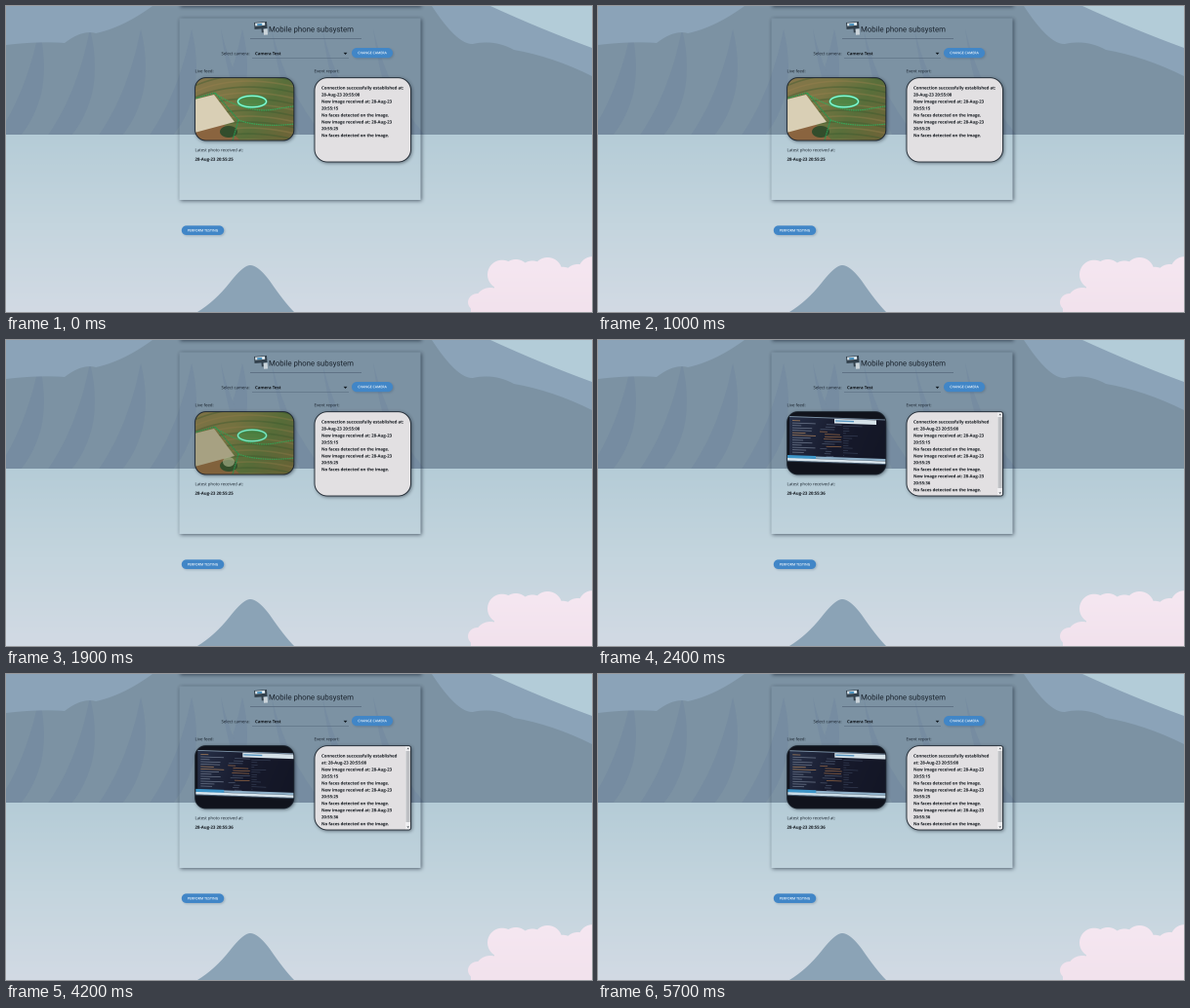
These frames come from a looping animation (600 px wide and 314 px high, 5800 ms). An HTML page with a canvas:

```html
<!DOCTYPE html>
<html lang="en">
<head>
<meta charset="utf-8">
<title>Mobile phone subsystem</title>
<style>
html, body { margin: 0; width: 100%; height: 100%; overflow: hidden; background: #b7cbd8; }
canvas { display: block; width: 600px; height: 314px; }
</style>
</head>
<body>
<canvas id="stage"></canvas>
<script>
const W = 600, H = 314, LOOP = 5800, HORIZON = 132;
const DIM = 1900, UPDATE = 2400, TIP = 3100, REFRESH = 450, TICK = 100;
const SANS = '"Open Sans", "Noto Sans", sans-serif';
const INK = '#18212b';

// The page is painted large, then reduced for soft small type
const S = 4;
const sheet = document.createElement('canvas');
sheet.width = W * S;
sheet.height = H * S;
const ctx = sheet.getContext('2d');
ctx.scale(S, S);
ctx.textRendering = 'geometricPrecision';

const stage = document.getElementById('stage');
const dpr = window.devicePixelRatio || 1;
stage.width = W * dpr;
stage.height = H * dpr;
const view = stage.getContext('2d');
view.imageSmoothingQuality = 'high';

function rect(x, y, w, h, color) {
  ctx.fillStyle = color;
  ctx.fillRect(x, y, w, h);
}

function shape(d, color) {
  ctx.fillStyle = color;
  ctx.fill(new Path2D(d));
}

function line(d, color, width, dash = []) {
  ctx.strokeStyle = color;
  ctx.lineWidth = width;
  ctx.setLineDash(dash);
  ctx.stroke(new Path2D(d));
  ctx.setLineDash([]);
}

function oval(x, y, rx, ry, color, width) {
  ctx.beginPath();
  ctx.ellipse(x, y, rx, ry, 0, 0, Math.PI * 2);
  ctx.fillStyle = ctx.strokeStyle = color;
  ctx.lineWidth = width;
  width ? ctx.stroke() : ctx.fill();
}

function gradient(x0, y0, x1, y1, ...colors) {
  const g = ctx.createLinearGradient(x0, y0, x1, y1);
  colors.forEach((c, i) => g.addColorStop(i / (colors.length - 1), c));
  return g;
}

function shadow(blur, color, draw) {
  ctx.save();
  ctx.shadowColor = color;
  ctx.shadowBlur = blur * S;
  ctx.shadowOffsetX = ctx.shadowOffsetY = S;
  draw();
  ctx.restore();
}

function text(str, x, y, { size = 4.32, weight = 400, color = INK, font = SANS, align = 'left' } = {}) {
  ctx.font = `${weight} ${size}px ${font}`;
  ctx.fillStyle = color;
  ctx.textAlign = align;
  ctx.fillText(str, x, y);
}

const bold = (str, x, y) => text(str, x, y, { weight: 700, color: '#10151b' });

// Small seeded generator for repeatable details
function seeded(seed) {
  return () => (seed = seed * 16807 % 2147483647) / 2147483647;
}

function mountains() {
  rect(0, 0, W, HORIZON, '#8ba3b8');
  shape('M496 0 Q548 24 600 43 V0Z', '#b3ccd8');
  const front = 'M0 40 Q35 36 60 38 Q78 24 92 28 Q120 22 150 0 H436 Q462 40 478 39 Q500 34 520 45 Q560 52 600 72 V132 H0Z';
  shape(front, '#7c92a3');
  ctx.save();
  ctx.clip(new Path2D(front));
  for (let i = 0; i < 9; i++) {
    const x = i * 52 - 10, lean = i < 5 ? 44 : -30;
    shape(`M${x} 134 Q${x + lean * .7} 90 ${x + lean} 24 Q${x + lean + 16} 90 ${x + 24} 134Z`, '#768ca1');
  }
  ctx.restore();
}

function cloud() {
  const pink = gradient(0, 260, 0, 314, '#f5e7f1', '#f2e2ed');
  for (let i = 0; i < 7; i++) {
    const top = 275 + 6 * Math.sin(i * 1.9 - .4);
    oval(508 + i * 15.5, top + 3, 15, 15, pink);
  }
  oval(522, 273, 14, 13, pink);
  oval(496, 302, 15, 13, pink);
  oval(483, 304, 10, 9, pink);
  rect(476, 303, 124, 11, pink);
  rect(500, 285, 100, 29, pink);
}

function landscape() {
  mountains();
  rect(0, HORIZON, W, H - HORIZON, gradient(0, HORIZON, 0, H, '#b5ccd7', '#c4d5de', '#d2dae4'));
  shape('M196 314 Q214 303 229 284 Q243 266 250 266 Q258 266 270 282 Q285 304 295 314Z', '#8ba3b6');
  cloud();
}

// Shadows fall outside the clear cards only
function cards() {
  ctx.save();
  ctx.beginPath();
  ctx.rect(0, 0, W, H);
  ctx.rect(177.5, 12.5, 247, 186.5);
  ctx.clip('evenodd');
  for (const [y, h] of [[12.5, 186.5], [-8, 8]]) {
    shadow(4, 'rgba(20,32,48,.65)', () => rect(177.5, y, 247, h, '#70869b'));
  }
  ctx.restore();
}

function cameraIcon() {
  ctx.save();
  ctx.translate(254, 17);
  ctx.rotate(-.08);
  rect(0, 0, 13, 7, '#33414d');
  rect(1, .7, 10, 3, '#dce6ec');
  rect(3, 1.5, 5, 2, '#4b91bd');
  rect(7, 6, 2, 5, '#33414d');
  rect(9, 7.5, 4, 6, '#cbd4da');
  ctx.restore();
}

function button(label, x, y, w, h) {
  shadow(2, 'rgba(30,60,90,.25)', () => {
    ctx.beginPath();
    ctx.roundRect(x, y, w, h, h / 2);
    ctx.fillStyle = '#4186c7';
    ctx.fill();
  });
  text(label, x + w / 2, y + h / 2 + 1.25, { size: 3.5, weight: 600, color: '#f4f9fd', align: 'center' });
}

function controls() {
  cameraIcon();
  text('Mobile phone subsystem', 269, 26.6, { size: 7.8, font: 'Roboto, sans-serif' });
  rect(250, 33.2, 114, .7, '#53667a');
  text('Select camera:', 220.5, 50.2);
  rect(252, 53, 99, .6, '#596d81');
  bold('Camera Test', 255, 50.2);
  shape('M345.6 47.8 h3.8 l-1.9 2.2Z', '#111820');
  button('CHANGE CAMERA', 354, 43, 42, 10.2);
  button('PERFORM TESTING', 179.8, 225.4, 43.4, 9.6);
  text('Live feed:', 193.5, 68.2);
  text('Event report:', 315.5, 68.2);
  text('Latest photo received at:', 193.5, 149.2);
}

function frameBox(x, y, w, h, r, fill, content) {
  const box = new Path2D();
  box.roundRect(x, y, w, h, r);
  ctx.fillStyle = fill;
  shadow(4, 'rgba(10,18,28,.6)', () => ctx.fill(box));
  ctx.save();
  ctx.clip(box);
  content();
  ctx.restore();
  ctx.strokeStyle = '#1d2630';
  ctx.lineWidth = .9;
  ctx.stroke(box);
}

function fieldPhoto(dim) {
  rect(193, 73, 103, 66, gradient(200, 74, 285, 138, '#85764a', '#7b7644', '#596f3b', '#6d6538'));
  for (let i = 0; i < 15; i++) {
    const y = 70 + i * 6;
    line(`M193 ${y} q43 -19 103 -5`, i % 2 ? 'rgba(153,128,78,.4)' : 'rgba(54,87,45,.4)', 1.6);
  }
  shape('M193 127 L222 121 L240 138 H193Z', '#8a643f');
  shape('M193 96 L213 91 L234 119 L193 130Z', dim ? '#b5ac90' : '#d9cfb5');
  oval(228, 129, 9, 6, '#334d2c');
  line('M193 95 L214 89 L238 117 L232 138', '#2b944f', 1.5, [1.5, .7]);
  line('M214 90 Q247 111 275 106 T296 104 M238 117 Q260 125 296 121', '#36a85a', 1.2, [1.5, .8]);
  oval(252, 98, 14.5, 5.8, 'rgba(65,151,76,.55)');
  oval(252, 98, 14.5, 5.8, '#36d6a1', 2);
  oval(252, 98, 14.5, 5.8, '#b0ffe1', .8);
  if (dim) {
    rect(193, 73, 103, 66, 'rgba(70,84,38,.13)');
    oval(228, 125, 6, 5, 'rgba(170,177,139,.65)');
  }
}

function screenPhoto(step, tip) {
  const random = seeded(41);
  rect(190, 70, 110, 72, '#10131c');
  ctx.save();
  // Each refresh of the hand-held feed sits slightly differently
  ctx.translate(194 + Math.sin(step * 2) * .3, 78 + Math.sin(step * 3) * .25);
  ctx.transform(1, .035, 0, 1, 0, 0);
  rect(2, 0, 100, 41, gradient(0, 0, 100, 40, '#28324a', '#171a2c', '#131625'));
  rect(2, 0, 100, .9, '#7d93a8');
  rect(48, 1.2, tip ? 54 : 43, 4.6, '#d5e1e8');
  rect(49, 2.6, 19, 1.4, '#5b98c2');
  for (let y = 4; y < 38; y += 2.5) {
    rect(5, y, 8 + random() * 17, .8, random() < .4 ? '#a07a58' : '#667084');
    rect(32 + random() * 8, y + 3, 6 + random() * 12, .7, random() < .4 ? '#9c6b46' : '#4b566d');
    rect(57, y + 4, random() * 20, .6, '#39435a');
  }
  rect(0, 40, 29, 3, '#3d96c9');
  rect(29, 40.5, 73, 2.3, '#8fb0c8');
  rect(0, 43, 102, 2.6, step % 2 ? '#c9dbe6' : '#d8e5ed');
  rect(0, 45.6, 102, 1, '#43576b');
  ctx.restore();
}

function photo(t) {
  frameBox(193.6, 73.6, 101.2, 64.4, 11, '#26333a', () => {
    if (t < UPDATE) fieldPhoto(t >= DIM);
    else screenPhoto(Math.floor((t - UPDATE) / REFRESH), t >= TIP);
  });
}

const DAY = '28-Aug-23';
const received = time => [`New image received at: ${DAY}`, time, 'No faces detected on the image.'];
const tail = [...received('20:55:15'), ...received('20:55:25')];
const early = ['Connection successfully established at:', `${DAY} 20:55:08`, ...tail];
const late = ['Connection successfully established', `at: ${DAY} 20:55:08`, ...tail, ...received('20:55:36')];

function scrollbar() {
  rect(409, 73, 6, 88, '#eeeef0');
  rect(409.5, 79, 4.3, 73, '#bec0c4');
  shape('M410.4 77.2 h2.6 l-1.3 -1.6Z M410.4 156.4 h2.6 l-1.3 1.6Z', '#53585e');
}

function report(updated) {
  const corners = updated ? [13, 2, 2, 13] : 13;
  frameBox(316, 73.7, 98.5, 86.3, corners, '#e2e0e2', () => updated && scrollbar());
  (updated ? late : early).forEach((row, i) => bold(row, 323, 85.6 + i * 6.96));
}

function draw(t) {
  const updated = t >= UPDATE;
  landscape();
  cards();
  controls();
  photo(t);
  report(updated);
  bold(`${DAY} 20:55:${updated ? 36 : 25}`, 193.5, 158.7);
  view.drawImage(sheet, 0, 0, stage.width, stage.height);
}

// Everything visible depends on these values, so equal keys need no repaint
const keyOf = t => t < UPDATE ? `field ${t >= DIM}` : `${Math.floor((t - UPDATE) / REFRESH)} ${t >= TIP}`;

const start = performance.now();
let shown = '';
function frame() {
  const t = Math.floor((performance.now() - start) % LOOP / TICK) * TICK;
  if (keyOf(t) !== shown) {
    shown = keyOf(t);
    draw(t);
  }
  requestAnimationFrame(frame);
}
frame();
</script>
</body>
</html>
```
